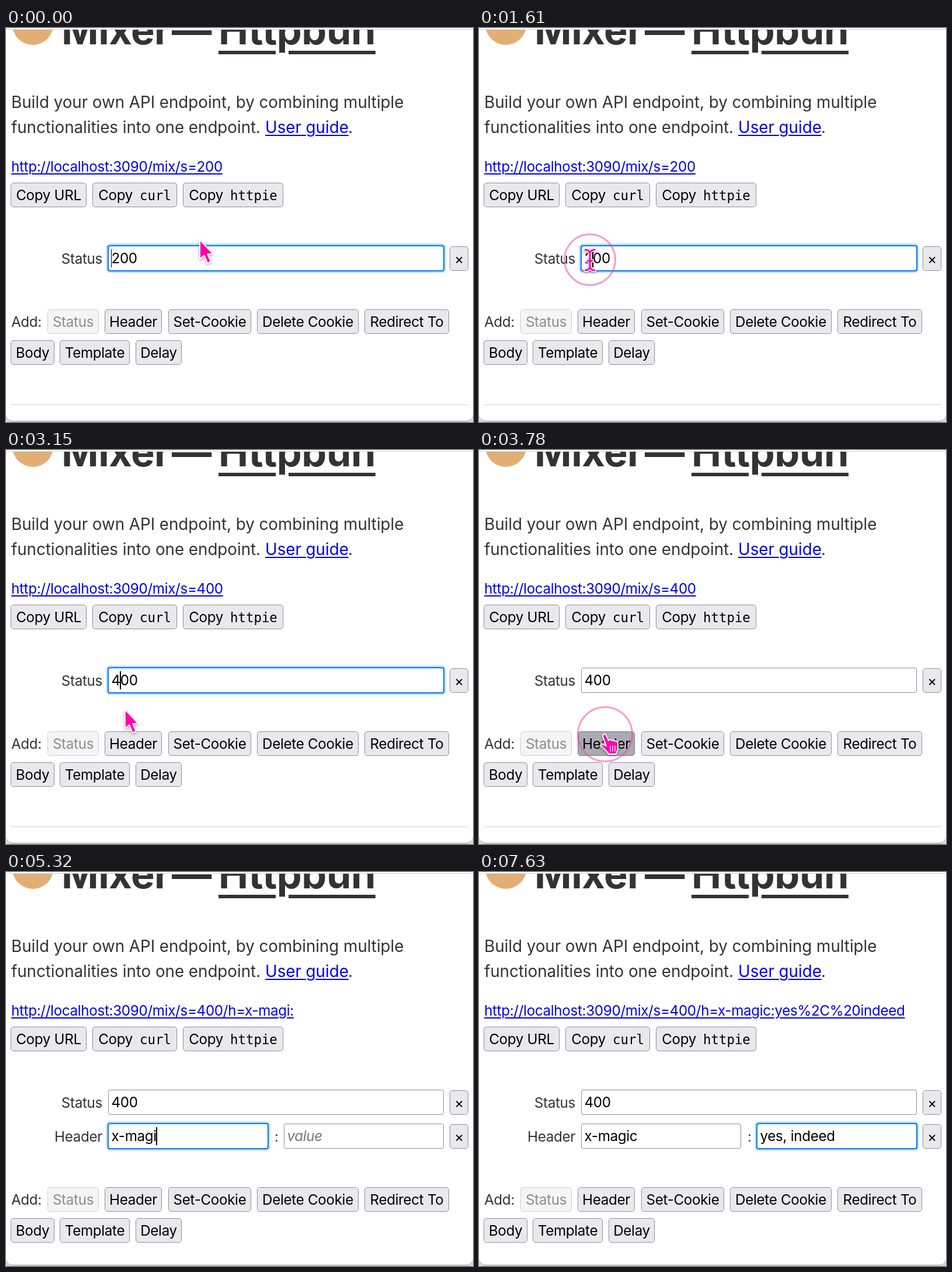
An HTML page that plays this animation: 800x675 px, repeating every 8 s.

```html
<!DOCTYPE html>
<html lang="en">
<head>
<meta charset="utf-8">
<title>Mixer</title>
<style>
html, body { margin: 0; width: 100%; height: 100%; overflow: hidden; background: #dcdcdc; }
#stage { position: absolute; left: 0; top: 0; width: 800px; height: 675px; overflow: hidden; }
#stage div { position: absolute; box-sizing: border-box; white-space: pre; }
#stage { font: 24.2px Inter, sans-serif; letter-spacing: -.32px; color: #333; }
#window { height: 674px; background: #fff; border-bottom: 1px solid #999; border-radius: 0 0 12px 12px; }
#bar { height: 3px; background: #fff; border-bottom: 1px solid #d6d6d6; }
#bun { height: 70px; border-radius: 50%; background: #e3ae76; }
#rule { height: 1px; background: #d2d2d2; }
.text { line-height: 0; }
.heading { font-weight: 700; letter-spacing: -.5px; }
.under { text-decoration: underline 6px; text-underline-offset: 11px; }
.intro { letter-spacing: -.05px; }
.label { width: 165px; text-align: right; }
.link { color: #00e; text-decoration: underline 2px; text-underline-offset: 3px; }
.button { height: 42px; line-height: 41px; text-align: center; color: #000; background: #e9e9ed; border: 1px solid #8f8f9d; border-radius: 5px; }
.off { color: #8c8c90; background: #f5f5f7; border-color: #cfcfd5; }
.hover { background: #d0d0d7; }
.down { background: #aaaab3; border-color: #77777f; }
.button code { font: 22.4px "DejaVu Sans Mono", monospace; letter-spacing: 0; margin-left: 12px; }
.input { height: 43px; line-height: 42.6px; padding-left: 4.5px; color: #000; background: #fff; border: 1px solid #8f8f9d; border-radius: 3px; }
.focus::after { content: ""; position: absolute; inset: -2px; border: 2px solid #0a7af0; border-radius: 4px; box-shadow: 0 0 0 2.5px #b5dcfb; }
.input em { color: #777; }
.caret { display: inline-block; width: 1.5px; height: 31px; margin: 0 -.75px; vertical-align: -7px; background: #000; }
#key { height: 84px; background: #1b1b1b; border-radius: 17px; }
svg { position: absolute; left: 0; top: 0; overflow: visible; }
#mouse { filter: drop-shadow(0 2px 2px #0005); }
</style>
</head>
<body>
<div id="stage"></div>
<script>
const stage = document.getElementById('stage');
const $ = id => document.getElementById(id);

function add(parent, cls, x, y, w, html = '', id = '') {
  const el = document.createElement('div');
  el.className = cls;
  el.id = id;
  el.style.cssText = `left:${x}px;top:${y}px;` + (w ? `width:${w}px` : '');
  el.innerHTML = html;
  parent.append(el);
  return el;
}
function text(parent, x, baseline, size, html, cls = '') {
  const el = add(parent, 'text ' + cls, x, baseline - size * .364, 0, html);
  el.style.fontSize = size + 'px';
  return el;
}
const label = (parent, baseline, html) => text(parent, 0, baseline, 24.2, html, 'label');
const button = (parent, x, y, w, html, cls = '') => add(parent, 'button ' + cls, x, y, w, html);
const input = (parent, x, y, w) => add(parent, 'input', x, y, w);

const win = add(stage, '', 0, 0, 800, '', 'window');

// Heading and introduction
add(win, '', 11, -41, 70, '', 'bun');
const heading = (x, s, cls = '') => text(win, x, 28, 68.3, s, 'heading ' + cls);
heading(95, 'Mixer');
heading(284, '—');
heading(364, 'Httpbun', 'under');
const intro = (x, y, s, cls = '') => text(win, x, y, 27.8, s, 'intro ' + cls);
intro(9, 137, 'Build your own API endpoint, by combining multiple');
intro(9, 180, 'functionalities into one endpoint.');
intro(444, 180, 'User guide', 'link');
intro(586, 180, '.');

const url = text(win, 9, 247, 24.2, '', 'link');
button(win, 8, 265, 130, 'Copy URL');
button(win, 148, 265, 145, 'Copy<code>curl</code>');
button(win, 303, 265, 172, 'Copy<code>httpie</code>');

// Form rows
label(win, 405, 'Status');
const status = input(win, 175, 373, 575);
button(win, 760, 374, 32, '×');
const row = add(win, '', 0, 0, 0);
label(row, 463, 'Header');
const name = input(row, 175, 431, 274);
text(row, 460, 463, 24.2, ':');
const value = input(row, 476, 431, 274);
button(row, 760, 432, 32, '×');

// Row of additions
const tools = add(win, '', 0, 0, 0);
text(tools, 9, 513, 24.2, 'Add:');
button(tools, 71, 482, 88, 'Status', 'off');
const header = button(tools, 169, 482, 98, 'Header');
button(tools, 278, 482, 142, 'Set-Cookie');
button(tools, 430, 482, 174, 'Delete Cookie');
button(tools, 614, 482, 145, 'Redirect To');
button(tools, 8, 535, 75, 'Body');
button(tools, 92, 535, 120, 'Template');
button(tools, 222, 535, 79, 'Delay');
add(tools, '', 8, 645, 784, '', 'rule');

add(stage, '', 0, 0, 800, '', 'bar');
const key = add(stage, '', 344, 540, 112, `<svg width="112" height="84" fill="none" stroke="#fff" stroke-width="4.5">
  <path d="M34 41H66M58 32L67 41L58 50M77 30V53"/></svg>`, 'key');

const beam = 'M-8 -17Q-1 -17 0 -11Q1 -17 8 -17M0 -11V12M-8 18Q-1 18 0 12Q1 18 8 18M-4 2H4';
stage.insertAdjacentHTML('beforeend', `<svg width="800" height="675">
  <circle id="ring" fill="none" stroke="#ee3c9b" stroke-width="3"/>
  <g id="mouse" fill="#ff00aa" stroke="#fff" stroke-linejoin="round" stroke-linecap="round">
    <path id="arrow" stroke-width="2" d="M0 0V33L7.5 26.5L13 40L19 37.5L13.5 24.5L23 24Z"/>
    <g id="beam" fill="none"><path stroke-width="6" d="${beam}"/><path stroke="#ff00aa" stroke-width="3" d="${beam}"/></g>
    <g id="hand"><path stroke-width="2" d="M-4 4C-5 -1 1 -2 2 2L6 11C8 8 11 9 12 11C14 9 17 10 17 12C20 11 22 13 22 16V25C21 29 19 30 19 34H6C4 29 -2 25 -7 20C-8 17 -5 16 -2 18L2 20Z"/>
      <path stroke-width="1.3" d="M9 20v9M13 20v9M17 20v9"/></g>
  </g></svg>`);

const PRESS = 1540, ERASE = 2100, RETYPE = 2690, CLICK = 3650, OPEN = 3900, TAB = 5810;
const blinks = [[500, 1000], [5600, TAB], [7560, 8000]];
const clamp = v => Math.min(1, Math.max(0, v));
const ease = (t, a, b) => { const u = clamp((t - a) / (b - a)); return u * u * (3 - 2 * u); };
const typed = (s, t, start, step) => s.slice(0, Math.max(0, Math.floor((t - start) / step) + 1));

function fill(el, s, focused, at, lit, hint = '') {
  el.classList.toggle('focus', focused);
  const caret = focused && lit ? '<span class="caret"></span>' : '';
  const html = s.slice(0, at) + caret + s.slice(at) + (s ? '' : `<em>${hint}</em>`);
  if (el.shown !== html) el.innerHTML = el.shown = html;
}

function draw(t) {
  const open = t >= OPEN;
  const code = t < ERASE ? '200' : t < RETYPE ? '00' : '400';
  const head = typed('x-magic', t, 4480, 150);
  const val = typed('yes, in', t, 6230, 115) + typed('deed', t, 7070, 70);
  const lit = !blinks.some(([a, b]) => t >= a && t < b);

  fill(status, code, t < CLICK, t < PRESS || code === '00' ? 0 : 1, lit);
  fill(name, head, open && t < TAB, head.length, lit, 'name');
  fill(value, val, t >= TAB, val.length, lit, 'value');
  const link = 'http://localhost:3090/mix/s=' + code + (open ? `/h=${head}:${encodeURIComponent(val)}` : '');
  if (url.textContent !== link) url.textContent = link;
  row.style.display = open ? '' : 'none';
  tools.style.top = open ? '58px' : 0;
  key.style.opacity = t < TAB + 70 ? 0 : 1 - clamp((t - 7050) / 250);

  // Pointer shape follows what lies beneath it
  const a = ease(t, 0, 910), b = ease(t, 2850, 3430);
  const x = 332 - 142 * a + 26 * b, y = 363 + 34 * a + 90 * b;
  const overHeader = y > 482 && !open;
  const shape = overHeader ? 'hand' : y > 372 && y < 418 ? 'beam' : 'arrow';
  for (const id of ['arrow', 'beam', 'hand']) $(id).style.display = id === shape ? '' : 'none';
  $('mouse').setAttribute('transform', `translate(${x} ${y})`);
  $('mouse').style.display = (t >= ERASE && t < 2850) || t >= 4480 ? 'none' : '';
  header.className = 'button' + (overHeader ? t >= CLICK ? ' down' : ' hover' : '');

  const age = t - (t < CLICK ? PRESS : CLICK);
  const ring = $('ring');
  ring.setAttribute('cx', x);
  ring.setAttribute('cy', y);
  ring.setAttribute('r', 40 + Math.max(0, age) * .05);
  ring.style.opacity = age < 0 ? 0 : .5 * (1 - clamp((age - 150) / 200));
}

function tick(now) {
  draw(now % 8000);
  requestAnimationFrame(tick);
}
draw(0);
requestAnimationFrame(tick);
</script>
</body>
</html>
```
